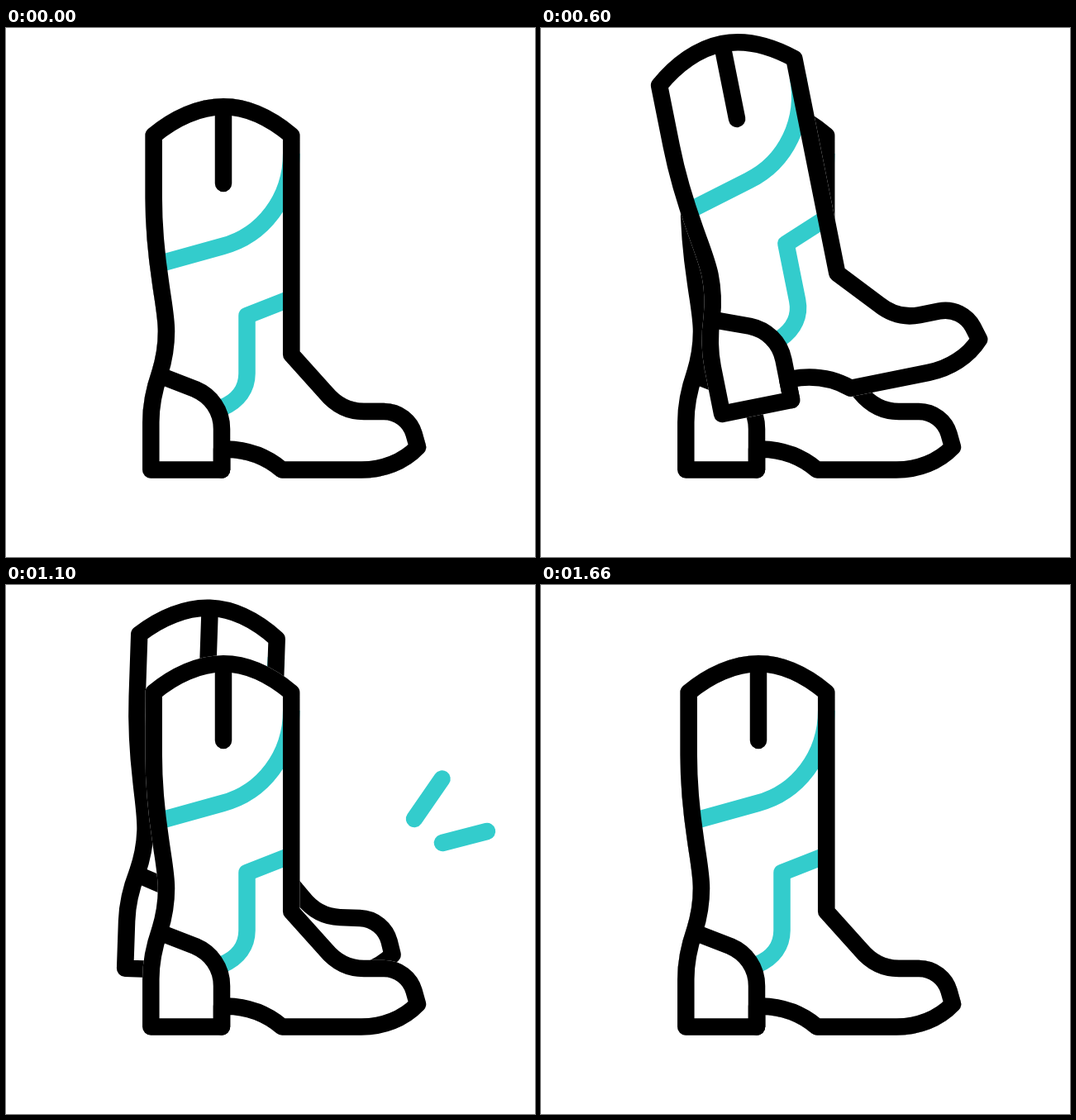
Recreate the animation shown at these times as an HTML page with a canvas. Size 640x640 px, loop 2.4 s.

```html
<!DOCTYPE html>
<html lang="en">
<head>
<meta charset="utf-8">
<title>Walking boots</title>
<style>
html, body { margin: 0; width: 100%; height: 100%; overflow: hidden; background: #fff; }
canvas { display: block; width: 100vmin; height: 100vmin; }
</style>
</head>
<body>
<canvas id="stage" width="640" height="640"></canvas>
<script>
const ctx = document.getElementById('stage').getContext('2d');
const LOOP = 2400, STEP = 20, LAG = 600, END = 1060;
const BLACK = '#000', TEAL = '#33cccc', WHITE = '#fff';
const LINE = 20.5;
const MID = [262, 332];      // centre of the boot at rest
const BALL = [322, 485];     // the forefoot bends around this point

const clamp = (v, a, b) => Math.min(b, Math.max(a, v));
const smooth = u => u * u * (3 - 2 * u);
const part = (t, a, b) => clamp((t - a) / (b - a), 0, 1);

// Boot centre over time: [ms, x, y]
const swing = [
  [-100, 262, 332], [0, 262, 332], [180, 233.7, 323.9], [300, 221.7, 300.3],
  [360, 223, 291.9], [540, 246.5, 258], [600, 264.4, 251.3], [650, 279, 248.5],
  [680, 287.6, 248.8], [780, 325.3, 280.7]
];
const landing = [[780, 325.3, 280.7], [960, 285.6, 328.9], [END, 262, 332]];

function slope(keys, i, k) {
  const rate = j => (keys[j + 1][k] - keys[j][k]) / (keys[j + 1][0] - keys[j][0]);
  if (i === 0) return rate(0);
  if (i === keys.length - 1) return rate(i - 1);
  const before = keys[i][0] - keys[i - 1][0], after = keys[i + 1][0] - keys[i][0];
  return (rate(i - 1) * after + rate(i) * before) / (before + after);
}

function spline(keys, t, k) {
  let i = 0;
  while (i < keys.length - 2 && t >= keys[i + 1][0]) i++;
  const a = keys[i], b = keys[i + 1], h = b[0] - a[0], u = (t - a[0]) / h;
  const w = smooth(u);
  return a[k] * (1 - w) + b[k] * w
    + h * slope(keys, i, k) * u * (1 - u) * (1 - u)
    - h * slope(keys, i + 1, k) * u * u * (1 - u);
}

function tilt(t) {
  if (t < 320) return 22.9 * smooth(part(t, 0, 320));
  if (t < 645) return 22.9 - 36.1 * smooth(part(t, 320, 645));
  if (t < 780) return -13.2 + 1.6 * smooth(part(t, 645, 780));
  if (t < 960) return -11.6 + 7.75 * part(t, 780, 960);
  return -3.85 * (1 - part(t, 960, END));
}

function bend(t) {
  return t < 265 ? 16.2 * smooth(part(t, 0, 265)) : 16.2 * (1 - smooth(part(t, 265, 560)));
}

function outline(deg) {
  const p = new Path2D(), r = -deg * Math.PI / 180, c = Math.cos(r), s = Math.sin(r);
  const f = (x, y) => {
    const dx = x - BALL[0], dy = y - BALL[1];
    return [BALL[0] + dx * c - dy * s, BALL[1] + dx * s + dy * c];
  };
  p.moveTo(178.7, 130);
  p.bezierCurveTo(204, 109, 234, 95.3, 263, 95.3);
  p.bezierCurveTo(292, 95.3, 320, 109, 345.2, 130);
  p.lineTo(345.2, 395);
  p.lineTo(...f(387, 441.5));
  p.bezierCurveTo(...f(399, 456), ...f(415, 464), ...f(433, 464));
  p.lineTo(...f(457, 464));
  p.bezierCurveTo(...f(475, 464), ...f(489, 476), ...f(493.5, 491));
  p.lineTo(...f(498, 507));
  p.bezierCurveTo(...f(481, 525), ...f(456, 534.5), ...f(430, 534.5));
  p.lineTo(...f(334, 534.5));
  p.bezierCurveTo(...f(316, 519), 293, 510, 266, 509.5);
  p.lineTo(261, 509.5);
  p.lineTo(261, 534.5);
  p.lineTo(175.3, 534.5);
  p.lineTo(175.3, 477);
  p.bezierCurveTo(175.3, 457, 179, 438, 186, 418);
  p.bezierCurveTo(191, 402, 194, 386, 194, 367);
  p.bezierCurveTo(194, 350, 190, 330, 187, 308);
  p.bezierCurveTo(182, 275, 178.7, 240, 178.7, 205);
  p.closePath();
  return p;
}

const trim = new Path2D(
  'M190 284 L262 264 C311 251 345.2 206 345.2 152' +
  'M345 327 L291.5 348 L291.5 418 C291.5 436 281 451 262 459');
const seams = new Path2D(
  'M263 98 L263 188 M189 421.5 L229 437 C248 445 261 463 261 485 L261 534.5');

function stroke(path, color) {
  ctx.strokeStyle = color;
  ctx.stroke(path);
}

function boot(time, flexes) {
  const t = clamp(time, 0, END), keys = t < 780 ? swing : landing;
  const body = outline(flexes ? bend(t) : 0);
  ctx.save();
  ctx.translate(spline(keys, t, 1), spline(keys, t, 2));
  ctx.rotate(tilt(t) * Math.PI / 180);
  ctx.translate(-MID[0], -MID[1]);
  ctx.fillStyle = WHITE;
  ctx.fill(body);
  stroke(body, WHITE);
  ctx.lineCap = 'butt';
  stroke(trim, TEAL);
  ctx.lineCap = 'round';
  stroke(seams, BLACK);
  stroke(body, BLACK);
  ctx.restore();
}

// Each spark grows outwards from its inner end, then its tail follows.
const sparks = [
  { from: [528, 312], to: [582, 298], start: 920, stop: 1140 },
  { from: [494, 283], to: [527.5, 234.5], start: 1030, stop: 1300 },
  { from: [451, 268.5], to: [438.5, 214.5], start: 1130, stop: 1380 }
];

function spark({ from, to, start, stop }, t) {
  const head = part(t, start, start + 70), tail = part(t, stop, stop + 80);
  if (head <= 0 || tail >= 1) return;
  const at = u => from.map((v, i) => v + (to[i] - v) * u);
  const p = new Path2D();
  p.moveTo(...at(tail));
  p.lineTo(...at(head));
  stroke(p, TEAL);
}

function draw(t) {
  ctx.fillStyle = WHITE;
  ctx.fillRect(0, 0, 640, 640);
  ctx.lineWidth = LINE;
  ctx.lineJoin = ctx.lineCap = 'round';
  boot(t - LAG, false);
  boot(t, true);
  sparks.forEach(s => spark(s, t));
}

const born = performance.now();
function frame() {
  const t = (performance.now() - born) % LOOP;
  draw(Math.floor(t / STEP) * STEP);
  requestAnimationFrame(frame);
}
frame();
</script>
</body>
</html>
```
